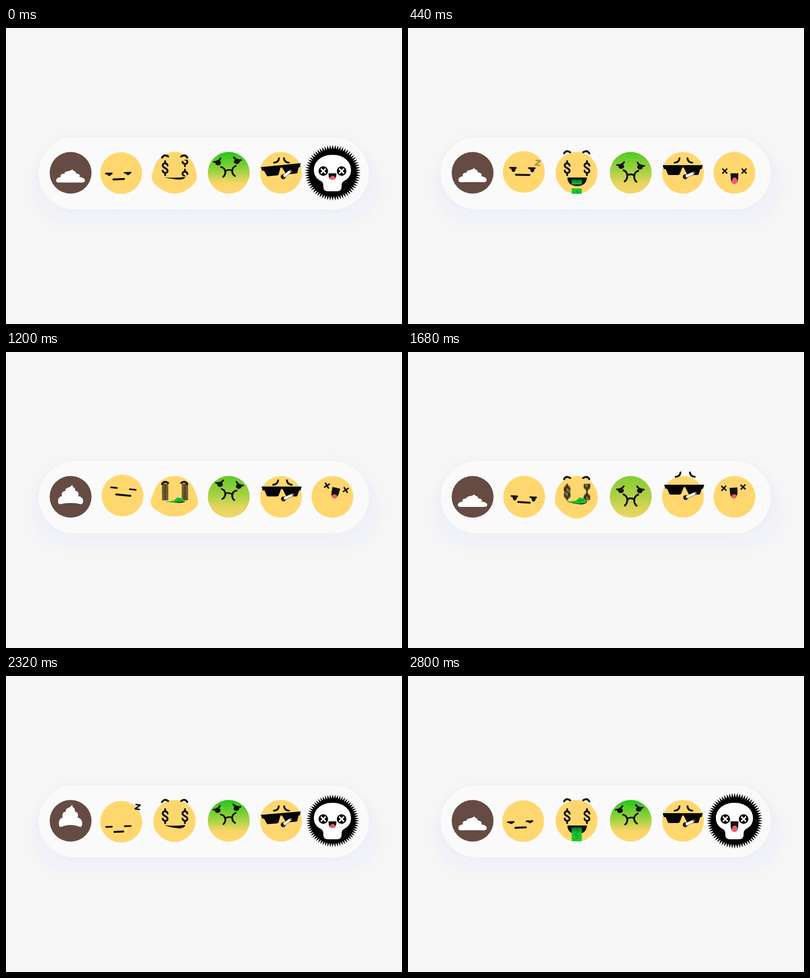
Write an HTML page with a canvas that moves like this. It is 800 px wide and 600 px high and loops after 2840 ms.

```html
<!DOCTYPE html>
<html lang="en">
<head>
<meta charset="utf-8">
<style>
html, body { margin: 0; width: 100%; height: 100%; overflow: hidden; background: #f6f6f6; }
canvas { display: block; }
</style>
</head>
<body>
<canvas id="stage" width="800" height="600"></canvas>
<script>
const ctx = document.getElementById('stage').getContext('2d');
const LOOP = 2840, BEAT = 2240, STEP = 40, RADIUS = 42.3;
const YELLOW = '#ffd76e', INK = '#16120f';

const clamp = v => Math.min(1, Math.max(0, v));
const ease = v => (v = clamp(v)) * v * (3 - 2 * v);
const ramp = (t, from, to) => ease((t - from) / (to - from));
const hold = (t, a, b, c, d) => ramp(t, a, b) * (1 - ramp(t, c, d));
const angleAt = (t, peak, period = LOOP) => (t - peak) / period * Math.PI * 2;
const wave = (t, peak, period) => Math.cos(angleAt(t, peak, period));

function placed(x, y, angle, draw) {
  ctx.save();
  ctx.translate(x, y);
  ctx.rotate(angle);
  draw();
  ctx.restore();
}

function fill(path, color) {
  ctx.fillStyle = color;
  ctx.fill(new Path2D(path));
}

function stroke(path, width = 4, color = INK) {
  ctx.lineWidth = width;
  ctx.strokeStyle = color;
  ctx.lineCap = ctx.lineJoin = 'round';
  ctx.stroke(new Path2D(path));
}

function oval(x, y, rx, ry, color, from = 0, to = Math.PI * 2) {
  ctx.beginPath();
  ctx.ellipse(x, y, rx, ry, 0, from, to);
  ctx.fillStyle = color;
  ctx.fill();
}

const disc = (x, y, r, color) => oval(x, y, r, r, color);

function capsule(x, y, w, h, color, blur, shadow) {
  ctx.save();
  ctx.shadowBlur = blur;
  ctx.shadowColor = shadow;
  ctx.beginPath();
  ctx.roundRect(x, y, w, h, h / 2);
  ctx.fillStyle = color;
  ctx.fill();
  ctx.restore();
}

function drawPill() {
  ctx.fillStyle = '#f6f6f6';
  ctx.fillRect(0, 0, 800, 600);
  capsule(52, 247, 704, 149, '#f2f3f8', 14, '#f2f3f8');
  capsule(66, 221, 667, 147, '#fafafa', 18, 'rgba(160,175,205,.1)');
}

function drawSwirl(t) {
  disc(130.5, 293.5, RADIUS, '#654b43');
  const stretch = ease((1 + wave(t, 905, LOOP / 2)) / 2);
  const top = 288.5 - 28 * stretch, bottom = 314 - 8 * stretch;
  ctx.save();
  ctx.translate(130.5, top);
  ctx.scale(29.5 - 6 * stretch, bottom - top);
  fill(`M.12 0Q.14 .1 .3 .16Q.4 .22 .36 .31C.62 .33 .7 .47 .6 .58C.86 .6 1.02 .72 1 .86Q.97 1 .82 1
    Q0 ${1 - .18 * stretch} -.82 1Q-1.02 1 -1 .86C-1.02 .72 -.9 .6 -.68 .58C-.76 .42 -.62 .32 -.4 .32
    C-.48 .12 -.05 .2 .12 0Z`, '#fff');
  ctx.restore();
}

function drawSleepy(t) {
  const nod = wave(t, 2330), drift = wave(t, 2600);
  const lag = 2 * Math.sin(2 * angleAt(t, 2330));
  const open = Math.sin(angleAt(t, 1050)) ** 2;
  const lidX = 212.5 - 5.5 * drift, lidY = 289.7 + 16 * nod - lag;
  const slant = .9 - 2.9 * drift, tilt = Math.atan2(slant, 38);

  disc(234 - 1.5 * drift, 293 + 2.5 * nod, RADIUS, YELLOW);
  for (const side of [0, 1]) placed(lidX + 38 * side, lidY + slant * side, tilt, () => {
    stroke('M-6 0H6', 3.4);
    oval(1, 0, 4.7, 9 * open, INK, 0, Math.PI);
  });
  const half = 12 - 3 * nod;
  placed(232 - 5 * drift, 302.5 + 13 * nod - lag, tilt, () => stroke(`M${-half} 0H${half}`));

  const z = t % (LOOP / 2), rise = ramp(z, 400, 800);
  ctx.globalAlpha = hold(z, 360, 560, 920, 1040);
  placed(262 + 4 * rise, 273.5 - 8 * rise, .15, () => stroke('M-4 -4.5H4.5L-4.5 4.5H4', 2.9));
  ctx.globalAlpha = 1;
}

function drawReel(x, offset, blur) {
  const pitch = 35, copies = blur > 0 ? 12 : 1;
  ctx.save();
  ctx.beginPath();
  ctx.rect(x - 10, 267, 20, 33.5);
  ctx.clip();
  ctx.globalAlpha = blur > 0 ? .17 : 1;
  for (let i = 0; i < copies; i++) {
    const shift = offset + blur * (2 * (i + .5) / copies - 1);
    for (const turn of [-1, 0, 1]) placed(x, 284 + shift + turn * pitch, 0, () =>
      stroke('M5 -5C4 -11 -5 -11 -5 -5.5C-5 0 5 0 5 5.5C5 11 -4 11 -5 5M0 -14.2V-10M0 10V14.2', 3.8));
  }
  ctx.restore();
}

function drawBills(t) {
  const pitch = 36, length = 28, speed = .147;
  const travel = t * speed % pitch;
  ctx.save();
  ctx.beginPath();
  ctx.rect(330.5, 307.5, 20.5, 28.5);
  ctx.clip();
  for (let bottom = 288.5 + travel; bottom < 370; bottom += pitch) {
    ctx.fillStyle = '#18c62d';
    ctx.fillRect(330.5, bottom - length, 20.5, length);
    placed(340.5, bottom - length / 2, 0, () => stroke('M0 -9L4 -5L-4 0L4 4L0 9', 1.2, '#08851b'));
  }
  const shade = ctx.createLinearGradient(0, 307, 0, 318);
  shade.addColorStop(0, 'rgba(0,50,10,.55)');
  shade.addColorStop(1, 'rgba(0,50,10,0)');
  ctx.fillStyle = shade;
  ctx.fillRect(330, 307, 22, 11);
  ctx.restore();
}

function drawCheeks(left, right, chin) {
  const bump = (a, center, size) => size * Math.exp(-(((a - center) / .36) ** 2));
  ctx.beginPath();
  for (let i = 0; i < 120; i++) {
    const a = i / 120 * Math.PI * 2 - Math.PI / 2;
    const r = RADIUS + bump(a, .32, right) + bump(a, Math.PI - .32, left) + bump(a, Math.PI / 2, chin);
    ctx.lineTo(340.5 + r * Math.cos(a), 293.5 + r * Math.sin(a));
  }
  ctx.fillStyle = YELLOW;
  ctx.fill();
}

function drawMoney(t) {
  const u = t % BEAT, bite = wave(u, 80, 320);
  const chew = Math.max(ramp(u, 1080, 1180), 1 - ramp(u, 0, 140));
  drawCheeks(chew * (5 - 2.5 * bite), chew * (3.8 - 3 * bite), chew * (2.3 * bite - .3));

  const brow = 251.5 + chew * (8.5 - 5 * bite);
  placed(321.5, brow, -.1, () => stroke('M-6.5 2Q-1 -5 6 1'));
  placed(360, brow, .1, () => stroke('M-6 1Q1 -5 6.5 2'));

  const spinning = u >= 1080;
  const roll = spinning ? (u - 1680) * .37 % 35 : 0;
  const blur = spinning ? 18 * Math.exp(-(u - 1180) / 320) : 0;
  drawReel(321.5, roll, blur);
  drawReel(361.5, spinning ? (roll + 17) % 35 : 17 * (1 - ramp(u, 0, 80)), blur);

  if (u >= 160 && u < 1080) {
    fill('M322 303H361.5C361 314 354 320.5 342 320.5C329 320.5 322 314 322 303Z', INK);
    drawBills(u);
    return;
  }
  const sag = 1.5 + 1.5 * bite;
  fill(`M320 302.5Q341 304.5 362 302Q362 ${305 + sag} 350 ${306 + sag}Q333 ${304.5 + sag} 320 302.5Z`, INK);
  if (u < 1080 || u > 2040) return;
  fill(`M322 304L340 301L346 294.5L357 297L360.5 ${303 + sag}L345 ${304.5 + sag}Z`, '#18c62d');
  stroke('M342 301L346 303L352 299L356 302', 1.3, '#08851b');
}

function drawSick(t) {
  const roll = wave(t, 2430);
  const heave = ((1 + wave(t, 350, LOOP / 2)) / 2) ** 3;
  const green = clamp(.85 + .6 * wave(t, 60) - .8 * heave);
  const blend = (a, b) => `rgb(${a.map((v, i) => Math.round(v + (b[i] - v) * green))})`;
  const g = ctx.createLinearGradient(0, 251, 0, 336);
  g.addColorStop(0, blend([130, 205, 50], [32, 199, 22]));
  g.addColorStop(.5, blend([178, 208, 70], [170, 211, 70]));
  g.addColorStop(.75, blend([214, 211, 88], [250, 213, 104]));
  g.addColorStop(1, blend([238, 212, 98], [255, 215, 112]));
  disc(450, 293.5, RADIUS, g);

  const tilt = Math.atan2(-4.3 * roll, 39);
  placed(449 - 2.6 * roll, 269.5 + 12 * heave, tilt, () => {
    for (const side of [1, -1]) {
      ctx.save();
      ctx.scale(side, 1);
      oval(-19, 1, 5.8, 5, INK);
      stroke('M-27.5 -1.5Q-23.5 -1 -19.5 -3Q-15.5 -4 -13.5 -8', 3.4);
      ctx.restore();
    }
  });
  placed(450, 289.5 + 12.5 * heave, tilt, () => {
    ctx.scale(1, .87 + .13 * heave);
    stroke('M-15 -12Q-7 -9 -7 0Q-7 7 -12 11M15 -12Q7 -9 7 0Q7 7 12 11M-7 -2Q0 -6 7 -2', 3.7);
  });
}

function drawCool(t) {
  const u = t % BEAT;
  const level = hold(u, 0, 400, 1740, BEAT), rise = hold(u, 700, 1600, 1740, BEAT);
  disc(555.5, 293.5, RADIUS, YELLOW);

  const browY = 268.5 - 20 * rise ** 3;
  placed(547 - 3 * level + 2 * rise, browY, 0, () => stroke('M-5.5 4.5Q3.5 4 4.5 -4.5', 3.7));
  placed(566 + 3 * level + 5 * rise, browY, 0, () => stroke('M5.5 4.5Q-3.5 4 -4.5 -4.5', 3.7));
  placed(555 + 3 * rise, 278 - 9 * rise, .1 * (level - 1), () =>
    fill(`M-40.5 0H40.5L38 8H35.5L32 18.5Q31 20 29 20H12Q9.5 20 8.5 18L2 5H-1L-6 18
      Q-7 20 -9.5 20H-27Q-29 20 -30 18.5L-34.5 8H-38Z`, '#050505'));

  const length = 20 + 3 * rise;
  placed(560 + rise, 301.5 - 6.5 * rise, .23 * level - .65, () => {
    disc(0, 0, 5, INK);
    disc(0, 1, 1.4, '#b98d38');
    stroke(`M3 0H${length}`, 6.2);
    ctx.fillStyle = '#fff';
    ctx.fillRect(1.5, -2.6, length - 4, 5.2);
    ctx.fillStyle = '#b4685a';
    ctx.fillRect(length - 2.5, -2.6, 3, 5.2);
  });
}

function drawSpikes(r) {
  const spikes = 64;
  ctx.beginPath();
  for (let i = 0; i < spikes * 2; i++) {
    const a = i / spikes * Math.PI - Math.PI / 2, d = i % 2 ? r * .84 : r;
    ctx.lineTo(660 + d * Math.cos(a), 293.5 + d * Math.sin(a));
  }
  ctx.fillStyle = '#000';
  ctx.fill();
}

function drawTongueMouth(y, h, tongue) {
  const shape = `M-8 0H8L7.5 ${h * .5}Q6.5 ${h} 0 ${h}Q-6.5 ${h} -7.5 ${h * .5}Z`;
  placed(0, y, 0, () => {
    fill(shape, INK);
    ctx.clip(new Path2D(shape));
    oval(.5, h, 6.8, tongue, '#f2596b');
  });
}

function drawLaugh(t) {
  const u = t % BEAT, secondZap = 500, laughStart = 1120, firstZap = 1740;
  const skull = u < 400 || u >= secondZap && u < laughStart || u >= firstZap;
  const laughing = !skull && u >= laughStart;

  if (skull) {
    const age = u >= firstZap ? u - firstZap : u >= secondZap ? u - secondZap : u + BEAT - firstZap;
    drawSpikes(53.5 + 3 * wave(u, 0, 320) + 13 * Math.exp(-age / 40));
    fill(`M659.5 257C681 257 697 270 697 288C697 298 692 305 685 309Q678 312 678 319V322Q678 331 668 331
      H651Q641 331 641 322V319Q641 312 634 309C627 305 622 298 622 288C622 270 638 257 659.5 257Z`, '#fff');
  } else {
    disc(659.5, 293.5, RADIUS, YELLOW);
  }

  const p = (u - laughStart) / (firstZap - laughStart);
  const sway = laughing ? Math.sin(p * Math.PI * 2) * (1 - .77 * p) : 0;
  const lift = laughing ? 15 * ramp(p, -.1, .15) : 0;
  const shout = hold(u, 0, 440, 1680, 1980);
  const h = 13 + 8.5 * shout;
  placed(659.5 + 12 * sway, 290 - lift, .35 * sway, () => {
    for (const x of skull ? [-18.5, 18.5] : [-19.5, 19.5]) placed(x, 0, 0, () => {
      if (skull) disc(0, 0, 9.7, '#0a0808');
      stroke('M-4 -4L4 4M4 -4L-4 4', 3.1, skull ? '#fff' : INK);
    });
    drawTongueMouth(laughing ? 0 : 4.5, h, h * (laughing ? .38 : .6));
  });
}

function render(now) {
  const t = Math.floor(now % LOOP / STEP) * STEP;
  drawPill();
  for (const draw of [drawSwirl, drawSleepy, drawMoney, drawSick, drawCool, drawLaugh]) draw(t);
}

const start = performance.now();
function tick() {
  render(performance.now() - start);
  requestAnimationFrame(tick);
}
tick();
</script>
</body>
</html>
```
